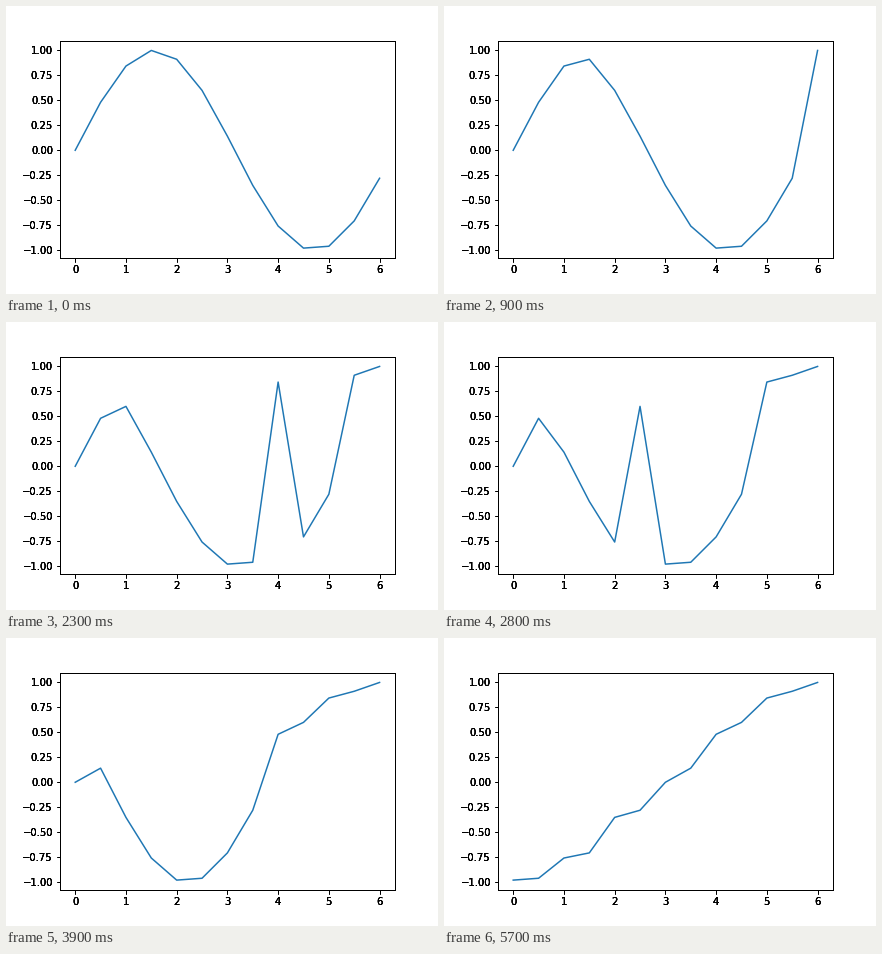
Write a matplotlib script that moves like this. It is 432x288 px and loops after 5.8 s.

```python
import numpy as np
import matplotlib.pyplot as plt
from matplotlib.animation import FuncAnimation

WIDTH, HEIGHT, DPI = 432, 288, 72
INTERVAL = 100
INK_LAYERS = 4  # repeated axes darken the antialiased ticks and labels

plt.rcParams.update({
    "font.family": "DejaVu Sans",
    "font.size": 10,
    "figure.subplot.left": 0.125,
    "figure.subplot.right": 0.9,
    "figure.subplot.bottom": 0.125,
    "figure.subplot.top": 0.88,
})


def bubble_states(values):
    """Return the list before sorting and after every swap."""
    v = list(values)
    states = [v[:]]
    for end in range(len(v) - 1, 0, -1):
        for i in range(end):
            if v[i] > v[i + 1]:
                v[i], v[i + 1] = v[i + 1], v[i]
                states.append(v[:])
    return states


x = np.arange(0, 6.5, 0.5)
states = bubble_states(np.sin(x))

fig, ax = plt.subplots(figsize=(WIDTH / DPI, HEIGHT / DPI), dpi=DPI,
                       facecolor="white")
line, = ax.plot(x, states[0], color="#1f77b4", lw=1.5)
xlim, ylim = ax.get_xlim(), ax.get_ylim()

for _ in range(INK_LAYERS - 1):
    layer = fig.add_axes(ax.get_position(), facecolor="none")
    layer.set(xlim=xlim, ylim=ylim)


def update(frame):
    line.set_ydata(states[frame])
    return line,


anim = FuncAnimation(fig, update, frames=len(states), interval=INTERVAL,
                     repeat=True, repeat_delay=0)
plt.show()
```
